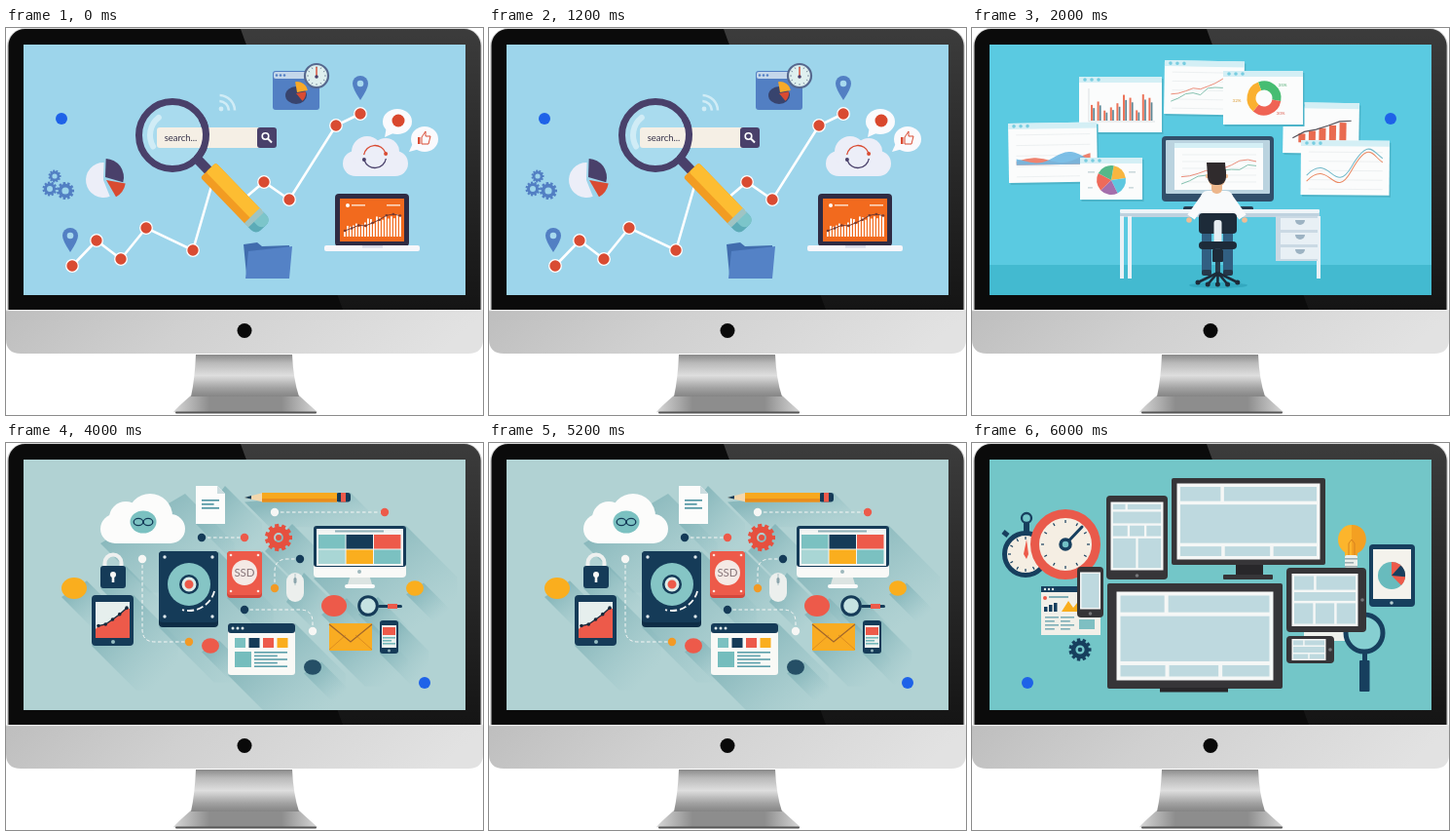
An HTML page for the animation above (8 s loop, 490 by 397 pixels).

```html
<!DOCTYPE html>
<html lang="en">
<head>
<meta charset="utf-8">
<title>Desktop slideshow</title>
<style>
html, body { margin: 0; width: 100%; height: 100%; overflow: hidden; background: #fff; }
svg { display: block; width: 490px; height: 397px; }
text { font-family: Lato, "Open Sans", sans-serif; }
</style>
</head>
<body>
<svg id="stage" viewBox="0 0 490 397" xmlns="http://www.w3.org/2000/svg"></svg>
<script>
const NAVY = '#153b58', CORAL = '#ed5a4a', GOLD = '#faae1e', TEAL = '#7bc1c1';

// Shape helpers, each returning markup
const R = (x, y, w, h, f, r = 0) => `<rect x="${x}" y="${y}" width="${w}" height="${h}" rx="${r}" fill="${f}"/>`;
const E = (x, y, rx, ry, f, more = '') => `<ellipse cx="${x}" cy="${y}" rx="${rx}" ry="${ry}" fill="${f}" ${more}/>`;
const C = (x, y, r, f, more) => E(x, y, r, r, f, more);
const P = (d, f, more = '') => `<path d="${d}" fill="${f}" ${more}/>`;
const S = (d, c, w = 1, more = '') => P(d, 'none', `stroke="${c}" stroke-width="${w}" ${more}`);
const ring = (x, y, r, c, w, f = 'none') => C(x, y, r, f, `stroke="${c}" stroke-width="${w}"`);
const G = (move, ...parts) => `<g transform="${move}">${parts.join('')}</g>`;
const T = (x, y, s, size, f) => `<text x="${x}" y="${y}" font-size="${size}" fill="${f}" text-anchor="middle">${s}</text>`;
const each = (list, fn) => list.map(fn).join('');
const list = (n, fn) => Array.from({ length: n }, (_, i) => fn(i));
const range = (n, fn) => list(n, fn).join('');

const at = (x, y, r, deg) => {
  const a = deg * Math.PI / 180;
  return `${(x + r * Math.cos(a)).toFixed(2)},${(y + r * Math.sin(a)).toFixed(2)}`;
};
const arc = (x, y, r, a, b) => `M${at(x, y, r, a)}A${r},${r} 0 ${b - a > 180 ? 1 : 0} 1 ${at(x, y, r, b)}`;
const wedge = (x, y, r, a, b, f) => P(`${arc(x, y, r, a, b)}L${x},${y}Z`, f);
const spokes = (x, y, r1, r2, n, f, w) => range(n, i => S(`M${at(x, y, r1, i * 360 / n)}L${at(x, y, r2, i * 360 / n)}`, f, w));
const gear = (x, y, r, f, hole = 0.4) =>
  ring(x, y, r * (0.8 + hole) / 2, f, r * (0.8 - hole)) + spokes(x, y, r * 0.7, r, 11, f, r * 0.3);

// Charts and layouts built from rules
const rnd = n => { const v = Math.sin(n * 12.9898) * 43758.5453; return v - Math.floor(v); };
const line = pts => 'M' + pts.join('L');
const trend = (x, y, w, h, n, seed) => list(n, i => {
  const t = i / (n - 1);
  return [x + w * t, y + h * (1 - 0.75 * t - 0.25 * rnd(seed + i))];
});
const bars = (x, base, n, step, w, high, f) => range(n, i => R(x + i * step, base - high(i), w, high(i), f));
const rules = (x, y, n, gap, w, f) => range(n, i => R(x, y + i * gap, w * (1 - 0.3 * (i % 2)), 1.6, f));
const dots = (x, y, n, gap, r, f) => range(n, i => C(x + i * gap, y, r, f));
const corners = (w, h, pad, r, f) => each([pad, w - pad], x => C(x, pad, r, f) + C(x, h - pad, r, f));

// Each row is [height share, ...column shares]
function layout(x, y, w, h, gap, rows, f) {
  const sum = a => a.reduce((p, q) => p + q, 0);
  const tall = (h - gap * (rows.length + 1)) / sum(rows.map(r => r[0]));
  let out = '', top = y + gap;
  for (const [share, ...cols] of rows) {
    const unit = (w - gap * (cols.length + 1)) / sum(cols);
    let left = x + gap;
    for (const c of cols) {
      out += R(left, top, c * unit, share * tall, f);
      left += c * unit + gap;
    }
    top += share * tall + gap;
  }
  return out;
}

function marketing() {
  const blue = '#527fc3', plum = '#49406a', red = '#d94b32', pale = '#eceef8', glow = '#d0ecf6';
  // the two nodes at 214 and 240 lie under the handle
  const nodes = [[68, 244], [93, 218], [118, 237], [144, 205], [192, 228], [214, 152], [240, 179], [265, 158], [291, 176], [339, 100], [364, 88]];
  const pin = (x, y) => P(`M${x - 8},${y}a8,8 0 0 1 16,0q0,5 -8,17q-8,-12 -8,-17Z`, blue) + C(x, y, 3.3, '#a7d9ee');
  const puff = (x, y, r) => C(x, y, r, pale);
  const graph = trend(348, 188, 57, 22, 9, 4);
  return R(18, 17, 454, 257, '#9dd5eb') +
    S(line(nodes), '#fff', 2.6) + each(nodes, ([x, y]) => ring(x, y, 6.3, '#fff', 1.3, red)) +
    pin(364, 57) + pin(66, 213) +
    C(221, 83, 2.4, glow) + each([10, 16], r => S(arc(219, 85, r, -88, -2), glow, 2.6)) +
    // search bar and lens
    ring(171, 110, 34.5, plum, 7, '#a9dbee') + S(arc(171, 110, 23, 150, 232), glow, 6, 'stroke-linecap="round"') +
    R(155, 102, 110, 21, '#f5efe5', 3) + R(258, 102, 20, 21, plum, 3) +
    ring(266.5, 111, 3.3, '#fff', 1.6) + S('M269,113.5l4,4', '#fff', 2) + S(arc(171, 110, 34.5, -30, 45), plum, 7) +
    T(179.5, 115.5, 'search...', 9.5, '#37334a') +
    G('translate(202 140) rotate(46)',
      R(-6, -5, 16, 10, plum), R(72, -11, 18, 22, '#5cabb7', 7), R(72, -11, 18, 14, '#7cc5ca', 6),
      R(8, -11, 70, 22, '#f29c22', 3), R(8, -11, 70, 14, '#fdbd32', 3), R(73, -11, 6, 22, '#9fc4c4')) +
    // dashboard with dial
    R(274, 44, 48, 40, '#527fc3', 3) + R(275, 45, 46, 7, '#c4d7ea', 2) + dots(278, 48.5, 3, 4, 1.2, blue) +
    E(298, 69, 11, 9, '#38446e') + wedge(298, 67, 10, -10, 50, red) + wedge(299, 66, 11, -100, -10, '#f8a928') +
    ring(319, 49, 12, '#56688e', 2.2, '#dff0ef') + spokes(319, 49, 8, 9.8, 12, '#66788d', 0.8) + S('M319,50V40', red, 1.4) + C(319, 50, 1.8, plum) +
    gear(50, 152, 6.5, blue) + gear(45, 165, 7.5, blue) + gear(61, 167, 9, blue) +
    wedge(100, 156, 18, 68, 272, pale) + wedge(102, 153, 19, -88, 16, plum) + wedge(103, 156, 20, 10, 60, red) +
    // cloud and bubbles
    puff(359, 139, 13) + puff(371, 127, 16) + puff(390, 127, 14) + puff(400, 139, 13) + R(359, 130, 41, 22, pale) +
    each([[190, red], [10, plum]], ([a, f]) => S(arc(379, 132, 11.5, a, a + 150), f, 1.3) + C(...at(379, 132, 11.5, a + 155).split(','), 2, f)) +
    E(402, 96, 15, 13, '#fafafd') + P('M391,101l-2,11l11,-5Z', '#fafafd') + C(403, 95, 6.5, '#d9472d') +
    E(430, 114, 14, 13, '#fafafd') + P('M418,118l-4,9l11,-3Z', '#fafafd') +
    S('M427,112l4,-6v5h5l-2,8h-7Z', red, 1, 'stroke-linejoin="round"') + R(423, 112, 2.5, 7, red) +
    // laptop
    R(338, 170, 76, 54, '#2f2b43', 4) + R(343, 175, 66, 44, '#f26a1e') +
    C(351, 182, 2, '#fff') + R(355, 181, 14, 1.6, '#fcd6bd') + R(391, 181, 14, 1.6, '#fcd6bd') +
    bars(347, 214, 20, 3, 1.8, i => 6 + i * 0.6 + 8 * rnd(i + 2), '#fff') +
    S(line(graph), '#783b30') + each(graph, ([x, y]) => C(x, y, 1.3, '#783b30')) +
    R(327, 223, 98, 6, '#f7f7fb', 2) + R(366, 223, 21, 2.5, '#d6d8e4') +
    // folder
    P('M244,222l14,-2l5,4l28,-1v30h-44Z', '#416dae') + P('M249,229l45,-5l-3,33h-45Z', '#5482c6');
}

function office() {
  const win = (x, y, w, h, turn, ...inner) => G(`translate(${x} ${y}) rotate(${turn})`,
    R(1.5, 2, w, h, '#4db4c9'), R(0, 0, w, h, '#fbfcfc'), R(0, 0, w, 6, '#d4eff5'), dots(6, 3, 3, 7, 1.8, '#78cde0'), ...inner);
  const grid = (w, h) => range(5, i => S(`M8,${12 + i * (h - 18) / 4}H${w - 7}`, '#e3e8e9', 0.6));
  const duo = w => S(line(trend(7, 14, w - 14, 24, 10, 3)), '#e9836e', 0.9) + S(line(trend(7, 20, w - 14, 24, 10, 8)), '#79bca8', 0.9);
  const hill = (lift, phase, f) => P(`M8,43L${line(list(39, i => [8 + i * 2, 41 - lift * (1 + Math.sin(i / 5 + phase)) * (0.4 + i / 70)])).slice(1)}V43Z`, f, 'opacity=".9"');
  const pie = ['#f8b63f', '#5dc7df', '#a46fac', '#ef6a5a', '#55b889'];
  const curve = (a, b, f) => S(`M6,${a}C30,${a - 25} 34,${a + 22} 52,${b + 9}S74,${b - 6} 84,${b}`, f);
  const high = i => 7 + 20 * rnd(i + 5);
  const steel = '#1d2b39', shirt = '#f9fafb', skin = '#f1bd94';
  return R(18, 17, 454, 257, '#5acae1') + R(18, 243, 454, 31, '#43bad0') +
    win(198, 33, 82, 55, 1, grid(82, 55), duo(82)) +
    win(110, 50, 85, 57, 0, S('M10,12V46H78', '#ced6d8', 0.7),
      bars(12, 45, 10, 6.6, 2, high, '#ec7359'), bars(14.3, 45, 10, 6.6, 1.7, i => high(i) * 0.8, '#5d8795')) +
    win(37, 98, 91, 61, -1, grid(91, 61), hill(5, 0, '#ed7660'), hill(7, 2.6, '#6fb8e4')) +
    win(320, 76, 78, 52, 1, bars(16, 41, 5, 10.5, 7, i => 9 + 3 * i, '#e96b50'), S(line(trend(10, 13, 60, 24, 6, 2)), '#56535b', 1.2)) +
    win(258, 44, 82, 55, 0, each(['#46bd72', '#ef6354', '#fab030'], (f, i) => S(arc(42, 28, 13, i * 120 - 110, i * 120 + 10), f, 9)),
      T(61, 16, '35%', 4.6, '#46a86a'), T(14, 32, '32%', 4.6, '#da962a'), T(59, 45, '30%', 4.6, '#dd5a4c')) +
    win(338, 115, 91, 56, 0.5, grid(91, 56), curve(42, 22, '#eb8a64'), curve(36, 18, '#72b9c9')) +
    win(111, 133, 64, 43, 0, each(pie, (f, i) => wedge(32, 23, 15, i * 72 - 80, i * 72 - 8, f)), each([8, 50], x => rules(x, 14, 2, 16, 7, '#ccdadd'))) +
    // computer and desk
    R(195, 111, 115, 67, '#314f6a', 4) + R(199, 115, 107, 55, '#bad3df', 1) +
    R(208, 118, 91, 48, '#fbfcfc') + R(208, 118, 91, 5, '#d4eff5') + G('translate(208 118)', grid(91, 46), duo(91)) +
    R(240, 178, 25, 7, '#24394e') + R(217, 183, 72, 5, '#263c50', 2) +
    R(152, 186, 205, 4, '#eef4f8', 1) + R(152, 190, 205, 4, '#bfd2df') + each([152, 160, 354], x => R(x, 193, 4, 64, '#e9f1f6')) +
    R(312, 193, 43, 46, '#cad9e4') + range(3, i => R(317, 195 + i * 15, 38, 12, '#e8f0f5') + wedge(337, 197 + i * 15, 5, 0, 180, '#9db3c3')) +
    // worker and chair
    E(253, 264, 30, 3, '#33a8bf') +
    each([241, 263], x => R(x - 5, 207, 10, 45, '#315f82', 3) + R(x - 5, 248, 10, 6, '#26384a', 2)) +
    each([[242, 223], [261, 280]], ([x, hand]) => C(x, 152, 2.2, skin) + C(hand, 197, 2.8, skin) +
      S(`M${x < 251 ? 240 : 263},173L${hand + (x < 251 ? 2 : -2)},194`, shirt, 9)) +
    R(235, 167, 33, 26, shirt, 7) + R(246, 155, 11, 15, '#edb68b', 5) + R(243, 144, 17, 18, skin, 6) +
    R(242, 140, 19, 21, '#302b2d', 8) + P('M242,152l-1,-14l19,0l1,14Z', '#302b2d') +
    R(233, 190, 39, 21, steel, 4) + R(248.5, 197, 8, 26, '#e6edf2', 3) + R(233, 219, 39, 8, steel, 4) +
    R(250, 226, 5, 29, '#283b4b') + R(247, 227, 11, 13, steel, 1) +
    range(5, i => { const x = 232 + i * 10.2, y = 261 + (i % 4 ? 2 : 0); return S(`M252.5,251L${x},${y}`, steel, 2.6) + C(x, y, 2.5, steel); });
}

function devices() {
  const white = '#f7f7f5', cloud = '#fcfcfb';
  let shades = '', art = '';
  // Places local artwork and casts a long shadow from its box
  const item = (x, y, w, h, ...parts) => {
    const l = 20 + 0.6 * Math.min(w, h);
    shades += P(`M${x},${y + h}L${x + w},${y}l${l},${l}v${h}h${-w}Z`, 'url(#fade)');
    art += G(`translate(${x} ${y})`, ...parts);
  };
  const blob = (x, y, r, f) => item(x - r, y - r * 0.6, r * 2, r * 1.3, E(r, r * 0.6, r, r * 0.85, f));
  const link = (x1, y1, f1, x2, y2, f2) => {
    const b = y1 === y2 ? 0 : 13, dx = b * Math.sign(x2 - x1), dy = b * Math.sign(y2 - y1);
    return S(`M${x1},${y1}V${y2 - dy}Q${x1},${y2} ${x1 + dx},${y2}H${x2}`, white, 1, 'stroke-dasharray="3.5 2.5"') + C(x1, y1, 4.2, f1) + C(x2, y2, 4.2, f2);
  };
  const links = link(140, 119, white, 188, 204, '#f29a25') + link(201, 97, NAVY, 245, 97, CORAL) + link(276, 71, white, 389, 71, CORAL) +
    link(276, 149, '#f29a25', 302, 119, NAVY) + link(315, 193, white, 245, 171, NAVY);
  const graph = trend(7, 13, 29, 22, 5, 6);

  blob(70, 149, 13, GOLD); blob(420, 149, 9, GOLD); blob(337, 167, 13, CORAL); blob(210, 208, 9, CORAL); blob(315, 230, 9, '#254f66');
  item(97, 52, 87, 51, C(15, 36, 15, cloud), C(26, 25, 17, cloud), C(51, 23, 23, cloud), C(72, 36, 15, cloud), R(15, 30, 57, 21, cloud),
    E(44, 29, 13.5, 11.5, TEAL), each([39, 49], x => E(x, 29, 4.8, 3.6, 'none', `stroke="${NAVY}" stroke-width="1.3"`)));
  item(195, 44, 30, 39, P('M0,0h22l8,8v31h-30Z', cloud), P('M22,0v8h8Z', '#cbdcdf'), rules(6, 14, 3, 4, 18, '#4b92a0'));
  item(245, 51, 109, 9.5, P('M0,5l19,-5v9.5Z', '#f4d7ad'), P('M0,5l7,-2v3.5Z', NAVY), R(94, 0, 15, 9.5, NAVY, 3), R(99, 0, 5, 9.5, CORAL),
    R(18, 0, 77, 9.5, '#f7a81e'), R(18, 6, 77, 3.5, '#e98d1c'));
  item(97, 126, 26, 23, S('M4.5,2v-5a8.5,8.5 0 0 1 17,0v5', '#eef0ef', 4), R(0, 0, 26, 23, NAVY, 3), C(13, 9, 3, white), R(11.7, 10, 2.6, 7, white));
  item(88, 156, 43, 52, R(0, 0, 43, 52, NAVY, 4), R(4, 7, 35, 37, '#e6efed'), P(`${line(graph)}L39,14V44H4V35Z`, CORAL),
    S(line(graph), '#17293b', 1.3), each(graph, ([x, y]) => C(x, y, 1.8, '#17293b')), C(22, 48, 2, '#94bcc2'));
  item(157, 111, 61, 78, R(0, 0, 61, 78, '#0e2d46', 4), R(0, 0, 61, 73, NAVY, 4), corners(61, 73, 6, 1.7, '#dfe9ec'),
    C(31, 34, 22, '#85c5c5'), C(31, 34, 10, NAVY), ring(31, 34, 6, '#dcece9', 3, CORAL), S(arc(31, 34, 27, 15, 105), white, 1.8, 'stroke-dasharray="7 3"'));
  item(227, 111, 36, 48, R(0, 0, 36, 48, '#d4473c', 4), R(0, 0, 36, 45, CORAL, 4), corners(36, 45, 4, 1.3, '#ffe2dc'), C(18, 22, 13, '#f4e9e5'), T(18, 26, 'SSD', 11.5, '#87767a'));
  item(266, 83, 28, 28, gear(14, 14, 14, '#e6503f', 0.35), C(14, 14, 3, '#e6503f'));
  item(288, 133, 18, 30, R(0, 0, 18, 30, '#ecefed', 9), S('M9,1v12', '#abc2c5'), R(7.5, 5, 3, 6, '#8ba5ac', 1.5));
  item(316, 85, 95, 54, P('M38,50h19l3,10h-25Z', '#dce4e2'), R(32, 60, 31, 4, cloud, 2), R(0, 0, 95, 53, '#f9f9f7', 4), R(0, 0, 95, 42, NAVY, 3), R(3, 3, 89, 38, '#f3f5f3'),
    R(22, 4.5, 50, 2, '#91b2ba'), each([TEAL, NAVY, CORAL, '#a9d6d5', GOLD, TEAL], (f, i) => R(5 + i % 3 * 28.5, 9 + (i > 2 ? 15.5 : 0), 27.5, 14.5, f)), C(47, 47, 2, '#9eb7bc'));
  item(362, 158, 20, 18, R(20, 8, 25, 3, NAVY, 1.5), R(30, 7, 10, 5, CORAL), ring(10, 9, 9.3, NAVY, 3, '#c5e3e2'));
  item(332, 185, 44, 28, R(0, 0, 44, 28, '#f9ac22', 1), S('M0,27L17,12M44,27L27,12', '#de8d1f'), S('M0,1l22,18l22,-18', '#a2672b', 1.3));
  item(384, 182, 19, 34, R(0, 0, 19, 34, NAVY, 3), R(2, 5, 15, 23, '#edf2ef'), R(3, 7, 13, 8, CORAL), rules(3, 17, 3, 3, 13, '#75b8ba'), C(9.5, 31, 1.5, '#91b2ba'));
  item(228, 185, 69, 53, R(0, 0, 69, 53, '#f9f9f6', 3), R(0, 0, 69, 10, NAVY, 3), dots(5, 5, 3, 5, 1.5, '#dcebea'),
    each([TEAL, NAVY, CORAL, GOLD], (f, i) => R(7 + i * 14.5, 15, 11, 10, f)), R(7, 29, 17, 16, '#75bdbd'), rules(27, 29, 5, 3.6, 34, '#5b9fab'));
  return R(18, 17, 454, 257, '#b1d2d3') + shades + links + art;
}

function screens() {
  const dark = '#363538', cream = '#f5eee3', ink = '#173f5e';
  const wide = [[2, 1, 2.3], [5.4, 1], [1.35, 1, 1.1, 1.05]];
  // home is the axis on which the button sits
  const device = (x, y, w, h, px, py, gap, rows, home) => {
    const sx = x + px - (home === 'x' ? 1.5 : 0), sy = y + py - (home === 'y' ? 1.5 : 0), sw = w - 2 * px, sh = h - 2 * py;
    return R(x, y, w, h, dark, home ? 4 : 2) + R(sx, sy, sw, sh, '#f5f7f6') + layout(sx, sy, sw, sh, gap, rows, '#bed9df') +
      (home ? C(home === 'x' ? x + w - 4 : x + w / 2, home === 'y' ? y + h - 4 : y + h / 2, 1.8, '#77777a') : '');
  };
  return R(18, 17, 454, 257, '#73c6c8') +
    // stopwatch and dial
    ring(56, 77, 5, ink, 2.3) + R(53, 82, 6, 9, ink) + S('M37,95l-5,-4', ink, 5) + ring(55, 114, 21.5, ink, 5, cream) +
    spokes(55, 114, 15, 18, 12, ink, 1.2) + P('M53,114l3,-15l2,15l-2,5Z', CORAL) +
    ring(96, 104, 31.5, '#e95a4b', 9, cream) + spokes(96, 104, 22, 25, 12, ink, 1.2) +
    S('M96,104L113,86', ink, 3, 'stroke-linecap="round"') + ring(96, 104, 5, ink, 3.5, '#72c1c6') +
    // report
    R(71, 147, 61, 50, '#f2f0e9') + R(71, 147, 61, 6, ink) + dots(75, 150, 3, 4, 1.2, '#e5ece9') +
    C(75, 159, 2, CORAL) + R(79, 157, 20, 2, '#81aeb7') + bars(74, 173, 3, 5, 3.5, i => 5 + i * 2, ink) +
    P('M92,173l7,-11l5,7l4,-5v9Z', GOLD) + each([75, 91], x => rules(x, 178, 4, 4, 14, '#7eaeb7')) + R(110, 181, 16, 10, '#7ebfc2') +
    gear(111, 212, 11.5, ink) + C(111, 212, 2.3, ink) +
    // bulb and chart tablet
    E(389.5, 99, 13.5, 15, '#fcb52c') + R(383, 106, 13, 10, '#fcb52c') + P('M390,84a13.5,15 0 0 1 6,29v3h-6Z', '#f4a022') + S('M387,115v-12l3,-4l3,4v12', '#d7831f') +
    R(383, 115, 13, 13, '#edf0ec', 2) + rules(383, 118, 3, 4, 13, '#9cadb1') +
    R(408, 104, 47, 64, ink, 4) + R(412, 109, 39, 51, '#f4f2ec') + C(431, 164, 1.8, '#b8d0d2') +
    C(431, 136, 14, '#68bbbd') + wedge(431, 136, 14, -90, 45, CORAL) + wedge(431, 136, 14, -48, 5, ink) +
    // lens
    R(341, 190, 48, 13, '#eef1ec') + ring(403, 195, 19, ink, 5, '#86cfd1') + R(401, 215, 5, 10, ink) + R(398, 223, 10.5, 32, ink, 1) +
    // screens
    device(205, 36, 158, 89, 5.5, 5.5, 3.5, wide) + R(271, 125, 28, 11, '#28272a') + R(258, 135, 51, 5, dark, 1) +
    device(138, 54, 63, 86, 4.5, 8, 2.3, [[1, 1, 2.7], [2.2, 1], [2, 1, 1, 1], [5.6, 1, 1]], 'y') +
    device(139, 144, 180, 108, 9.5, 8.5, 4, wide) + R(193, 251, 70, 4.5, '#28272a') +
    device(108, 127, 27, 52, 3, 7, 1.5, [[1, 1]], 'y') +
    device(323, 128, 82, 66, 7, 6, 2.5, [[1.6, 1, 2], [1, 1], [2.4, 1, 1, 1]], 'x') +
    device(323, 198, 49, 28, 7, 3, 1.5, [[1, 1, 2], [1.2, 1], [1, 1, 1]], 'x');
}

const grad = (id, x2, y2, ...stops) => `<linearGradient id="${id}" x1="0" y1="0" x2="${x2}" y2="${y2}">` +
  each(stops, ([o, c, a = 1]) => `<stop offset="${o}" stop-color="${c}" stop-opacity="${a}"/>`) + '</linearGradient>';
const defs = `<defs><clipPath id="view">${R(18, 17, 453.5, 257, '#000')}</clipPath>` +
  grad('fade', 1, 1, [0.25, '#7db0b5', 0.75], [0.85, '#94c0c4', 0]) +
  grad('chin', 1, 0.1, [0, '#bebebe'], [0.4, '#d0d0d0'], [1, '#e2e2e2']) +
  grad('gloss', 0, 1, [0, '#fff', 0.2], [1, '#fff', 0.04]) +
  grad('stand', 0, 1, [0, '#8a8a8a'], [0.2, '#b9b9b9'], [0.5, '#dedede'], [0.8, '#a2a2a2'], [1, '#858585']) +
  grad('foot', 1, 0, [0, '#d8d8d8'], [0.25, '#8d8d8d'], [0.75, '#8d8d8d'], [1, '#d8d8d8']) + '</defs>';

const body =
  R(1, 0, 488, 310, '#d2d2d2', 19) + R(2.5, 1, 485, 310, '#0b0b0b', 17) +
  P('M241,1H470Q487,1 487,18V289H346Z', 'url(#gloss)') +
  P('M0,289H490V319Q490,334 475,334H15Q0,334 0,319Z', 'url(#chin)') + R(0, 289, 490, 1.2, '#e9e9e9') +
  C(245, 310.5, 7.5, '#090909') +
  P('M190,377Q177,388 172,394H320Q313,388 301,377Z', 'url(#foot)') + R(174, 393.5, 145, 2, '#555', 1) +
  P('M195,335H294Q295,360 301,378H190Q194,360 195,335Z', 'url(#stand)');

const stage = document.getElementById('stage');
const scenes = [marketing, office, devices, screens];
stage.innerHTML = defs + body + '<g clip-path="url(#view)">' +
  each(scenes, draw => `<g class="scene">${draw()}</g>`) + C(0, 0, 6, '#1e62e8', 'id="dot"') + '</g>';

const spots = [[57, 93], [430, 93], [430, 246], [57, 246]];
const timing = { duration: 8000, iterations: Infinity };
const hold = fn => list(5, i => ({ ...fn(i % 4), offset: i / 4, easing: 'step-end' }));
stage.querySelectorAll('.scene').forEach((el, n) =>
  el.animate(hold(i => ({ opacity: i === n ? 1 : 0 })), timing));
document.getElementById('dot').animate(
  hold(i => ({ transform: `translate(${spots[i][0]}px, ${spots[i][1]}px)` })), timing);
</script>
</body>
</html>
```
